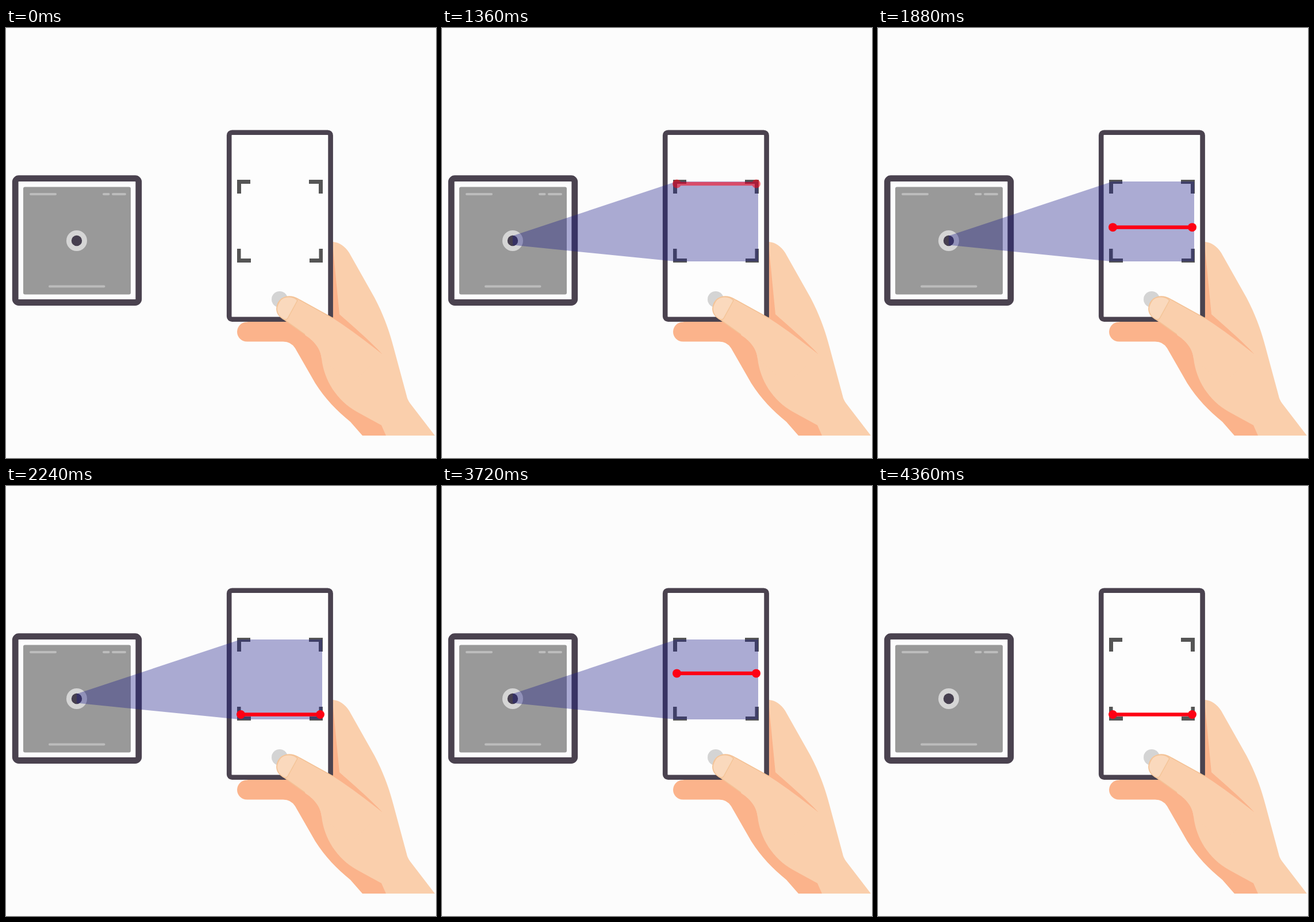
Write an HTML page that moves like this. It is 748 px wide and 748 px high and loops after 4400 ms.

```html
<!DOCTYPE html>
<html lang="en">
<head>
<meta charset="utf-8">
<title>Phone scan</title>
<style>
  html, body { margin: 0; width: 100%; height: 100%; overflow: hidden; background: #fcfcfc; }
  svg { display: block; width: 100%; height: 100%; }
</style>
</head>
<body>
<svg viewBox="0 0 748 748">
  <g id="device">
    <rect x="16.2" y="261.7" width="214.6" height="215.8" rx="6" fill="#fcfcfd" stroke="#4a424f" stroke-width="10.8"/>
    <rect x="30" y="276.5" width="187" height="187" rx="3" fill="#999"/>
    <path d="M43 289H86M170 289H178.500M186 289H207M76 449.500H170.500" fill="none" stroke="#bcbcbc" stroke-width="4" stroke-linecap="round"/>
    <circle cx="123" cy="370" r="18" fill="#d5d5d5"/>
    <circle cx="123" cy="370" r="9.2" fill="#463f4f"/>
  </g>

  <path id="fingers" fill="#fbb38b" d="M419 511.500A17 17 0 0 0 419 545.500H482Q496 545.500 503 557L538 618C555 645 575 665 599 685L620 709H670V600L569 480Z"/>
  <path id="palm" fill="#facfac" d="M560 372H569C580 373 590 380 597 391L641 469C660 505 669 535 677 566L697 640Q698 646 703 653L746 709H661L653 691L611 668C575 648 553 612 549 575C547 556 535 544 520 534L560 480Z"/>
  <path id="crease" fill="#fbb38b" d="M568 375L580 498C605 520 635 546 655 568C625 545 595 522 560 500Z"/>

  <g id="phone">
    <rect x="388.2" y="181.700" width="176.400" height="325" rx="5" fill="#fdfdfd" stroke="#4a424f" stroke-width="8.600"/>
    <path fill="#555" d="M402 264H425V271H409V288H402ZM551 264H527V271H544V288H551ZM402 384H408.500V401H426V408H402ZM551 384H544.500V401H528V408H551Z"/>
    <circle cx="476" cy="472" r="14" fill="#d4d4d4"/>
  </g>

  <g id="thumb">
    <path fill="#facfac" d="M655 568C625 544 597 523 569 505L511 473C503 468 495 465 486 468C470 473 466 493 478 503L520 533C535 544 547 556 549 575L600 620Z"/>
    <path fill="none" stroke="#f4c296" stroke-width="1.500" d="M569 505L511 473C503 468 495 465 486 468C470 473 466 493 478 503L520 533"/>
    <path fill="#fad9bd" stroke="#f4c599" stroke-width="1.500" d="M488 468C497 467 504 470 507 474L490 505Q487 509 482 506C472 500 469 490 473 481C476 473 481 469 488 468Z"/>
  </g>

  <path id="beam" fill="#191987" fill-opacity=".36" d="M123 361.500L402 269L406 267H550V406H406L123 377.500Z"/>
  <g id="scan" fill="#fe0014">
    <rect x="408" y="-3.200" width="138" height="6.400"/>
    <circle cx="408.500" r="7.500"/>
    <circle cx="546.500" r="7.500"/>
  </g>
</svg>
<script>
  const LOOP = 4400, STEP = 40, SPEED = 0.1455, BOTTOM = 397.5;
  const beam = document.getElementById('beam');
  const scan = document.getElementById('scan');
  const clamp = v => Math.max(0, Math.min(1, v));

  const beamAlpha = t => Math.min(clamp((t - 640) / 400), clamp(1 - (t - 3880) / 480));

  function scanAlpha(t) {
    if (t < 1360 || (t >= 2800 && t < 3360)) return 0;
    return t < 1400 || (t >= 2760 && t < 2800) ? 0.55 : 1;
  }

  function scanY(t) {
    const y = t < 2800 ? 271 + SPEED * (t - 1360) : 273.5 + SPEED * (t - 3360);
    return Math.min(BOTTOM, y);
  }

  function draw(now) {
    const t = Math.floor(now % LOOP / STEP) * STEP;
    beam.setAttribute('opacity', beamAlpha(t));
    scan.setAttribute('opacity', scanAlpha(t));
    scan.setAttribute('transform', `translate(0 ${scanY(t)})`);
  }

  const start = performance.now();
  function tick() {
    draw(performance.now() - start);
    requestAnimationFrame(tick);
  }
  tick();
</script>
</body>
</html>
```
